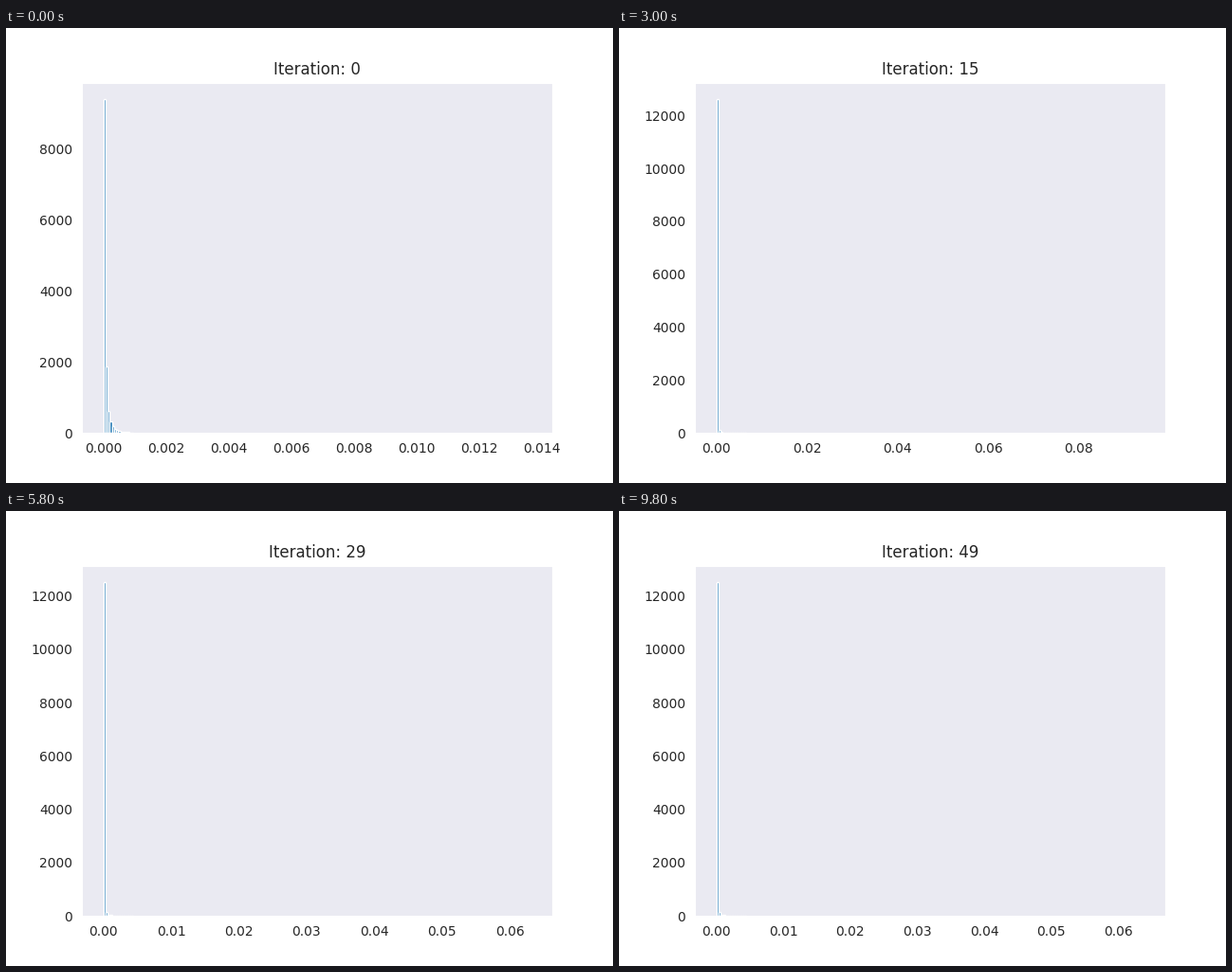
Write a matplotlib script that moves like this. It is 640 px wide and 480 px high and loops after 10 s.

```python
import numpy as np
import matplotlib.pyplot as plt
from matplotlib.animation import FuncAnimation

FRAMES = 50
INTERVAL = 200
TOTAL = 12800   # samples in the histogram
BINS = 200
SHOWN = 14      # bins past this one are practically empty

plt.rcParams.update({
    "font.family": "DejaVu Sans",
    "axes.facecolor": "#EAEAF2",
    "axes.edgecolor": "white",
    "axes.axisbelow": True,
    "text.color": ".15",
    "xtick.color": ".15",
    "ytick.color": ".15",
    "xtick.bottom": False,
    "ytick.left": False,
})

# Key points of the largest value: fast growth, peak, slow settling
KEY_STEPS = np.array([0, 4, 8, 11, 15, 21, 25, 29, 33, 37, 49])
KEY_PEAKS = np.array([.01364, .032, .0737, .1009, .0944, .0774,
                      .0673, .0631, .0618, .06248, .0638])
KEY_SLOPES = np.gradient(KEY_PEAKS, KEY_STEPS)


def peak_at(i):
    """Smooth cubic Hermite curve through the key points."""
    n = min(np.searchsorted(KEY_STEPS, i, side="right"), len(KEY_STEPS) - 1)
    (x0, x1), (y0, y1), (s0, s1) = (
        a[n - 1:n + 1] for a in (KEY_STEPS, KEY_PEAKS, KEY_SLOPES))
    h = x1 - x0
    t = (i - x0) / h
    ease = t * t * (3 - 2 * t)
    return (y0 + (y1 - y0) * ease
            + h * t * (1 - t) * (s0 * (1 - t) - s1 * t))


k = np.arange(1, SHOWN)
tail = k ** -1.4 * np.exp(-(k - 1) / 8)
tail /= tail.sum()


def counts(i, peak):
    """Wider bins leave fewer samples outside the first one."""
    rest = 288 * (.0631 / peak) ** 1.08 + 1908 * .5 ** i
    return np.round(np.append(TOTAL - rest, rest * tail))


fig, ax = plt.subplots(figsize=(6.4, 4.8), dpi=100)
bars = ax.bar(np.arange(SHOWN), np.zeros(SHOWN), width=1, align="edge",
              color="C0", edgecolor="white", linewidth=1)
title = ax.set_title("")


def update(i):
    peak = peak_at(i)
    heights = counts(i, peak)
    width = peak / BINS
    for n, (bar, h) in enumerate(zip(bars, heights)):
        bar.set_bounds(n * width, 0, width, h)
    ax.set_xlim(-.05 * peak, 1.05 * peak)
    ax.set_ylim(0, 1.05 * heights[0])
    title.set_text(f"Iteration: {i}")
    return [*bars, title]


anim = FuncAnimation(fig, update, frames=FRAMES, interval=INTERVAL,
                     init_func=lambda: update(0), repeat=True,
                     repeat_delay=0, blit=False)
plt.show()
```
